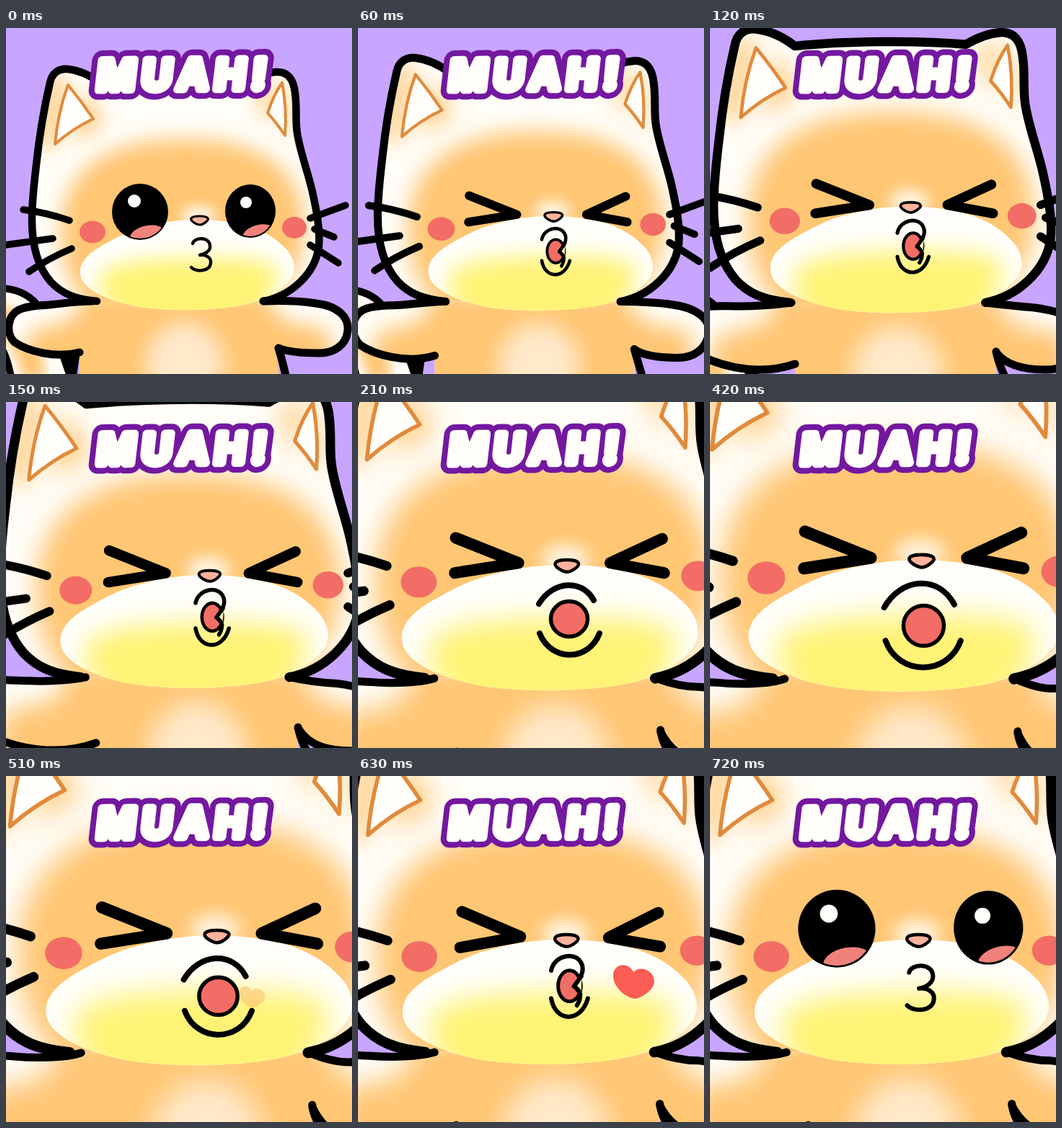
Animation, 480 px wide and 480 px high, one loop 0.75 s. Source, as an HTML page:

```html
<!DOCTYPE html>
<html lang="en">
<head>
<meta charset="utf-8">
<title>Muah!</title>
<style>
html, body { margin: 0; width: 100%; height: 100%; overflow: hidden; background: #c8a5ff; }
svg { display: block; width: 100vw; height: 100vh; }
.ink { fill: none; stroke: #000; stroke-linecap: round; stroke-linejoin: round; }
.word { font: 700 57px Inter, "Open Sans", sans-serif; letter-spacing: 9px; text-anchor: middle; stroke-linejoin: round; }
</style>
</head>
<body>
<svg viewBox="0 0 480 480">
  <defs>
    <filter id="soft" x="-40%" y="-40%" width="180%" height="180%"><feGaussianBlur stdDeviation="14"/></filter>
    <filter id="fine" x="-40%" y="-60%" width="180%" height="220%"><feGaussianBlur stdDeviation="8"/></filter>
    <path id="skull" d="M126 379C96 376 78 369 62 352C43 330 36 298 36 266C36 240 39 215 42 190C46 152 53 110 61 76C64 61 74 56 86 57C104 59 119 67 132 77C190 71 275 70 334 75C346 68 360 62 374 61C392 60 399 72 401 90C404 112 401 128 404 146C408 172 419 200 425 227C431 254 436 280 434 303C429 342 394 372 357 379"/>
    <path id="snout" d="M103 337C104 320 121 308 142 297C158 288 175 280 192 276C220 268 244 266 266 266C293 266 318 269 340 276C360 283 374 292 385 303C394 311 400 322 400 334C398 359 360 379 325 385C280 393 220 393 180 386C140 378 101 362 103 337Z"/>
    <clipPath id="inSkull"><use href="#skull"/></clipPath>
    <clipPath id="inSnout"><use href="#snout"/></clipPath>
    <clipPath id="inBody"><path id="bodyClip"/></clipPath>
    <clipPath id="inEyeL"><circle cx="186" cy="255" r="37"/></clipPath>
    <clipPath id="inEyeR"><ellipse cx="339" cy="254" rx="33" ry="35"/></clipPath>
  </defs>
  <rect width="480" height="480" fill="#c8a5ff"/>

  <g id="tail">
    <path d="M-20 361C12 359 34 369 48 390C72 425 74 455 90 490L8 490C4 465 -4 440 -20 425Z" fill="#fffdf8"/>
    <path d="M-10 395Q30 430 40 485" fill="none" stroke="#ffc673" stroke-width="34" filter="url(#fine)"/>
    <path class="ink" stroke-width="10" d="M-20 361C12 359 34 369 48 390M-20 425C-4 440 4 465 8 490"/>
    <path d="M73 452L103 448L98 484L84 484Z"/>
  </g>

  <path id="bodyFill" fill="#fffdf8"/>
  <g clip-path="url(#inBody)">
    <g id="bodyTint">
      <path d="M108 365L362 365Q372 408 410 412Q452 412 452 440L452 520L28 520L28 440Q30 412 70 412Q100 408 108 365Z" fill="#ffc673" filter="url(#soft)"/>
      <ellipse cx="248" cy="466" rx="54" ry="58" fill="#ffe9cb" filter="url(#soft)"/>
    </g>
  </g>

  <g id="head">
    <use href="#skull" fill="#fffdf8"/>
    <g clip-path="url(#inSkull)">
      <g fill="#ffc673" filter="url(#soft)">
        <path d="M76 280C78 190 150 154 245 154C340 154 408 184 414 270C416 330 392 350 355 400L126 400C100 370 75 340 76 280Z"/>
        <path d="M60 70L84 66L66 165L42 165ZM104 84L136 130L92 158ZM346 84L374 70L364 140ZM388 70L408 120L396 160Z"/>
      </g>
      <ellipse cx="267" cy="260" rx="24" ry="14" fill="#fff4e2" filter="url(#fine)"/>
    </g>
    <use href="#snout" fill="#fffefa"/>
    <g clip-path="url(#inSnout)">
      <path d="M130 345Q140 321 250 319Q364 315 378 336Q376 380 330 415L170 415Q128 385 130 345Z" fill="#fff374" filter="url(#soft)"/>
    </g>
    <g fill="#fffefa" stroke="#e18a3b" stroke-width="4" stroke-linejoin="round">
      <path d="M86 79Q105 102 121 126Q93 139 68 161Q72 117 86 79Z"/>
      <path d="M383 76Q371 93 363 118Q375 131 387 149Q390 111 383 76Z"/>
    </g>
    <use class="ink" href="#skull" stroke-width="10.5"/>
    <path class="ink" stroke-width="9.5" d="M24 252Q56 256 88 267M-8 302L65 292M32 338Q58 320 91 306M422 264L471 246M428 279L455 290M422 301L461 326"/>
    <g fill="#f26d65">
      <ellipse cx="120" cy="283" rx="18" ry="15.5"/>
      <ellipse cx="400" cy="277" rx="17" ry="15"/>
    </g>
    <path class="ink" style="fill:#ffb29c" stroke-width="3.2" d="M257 264C259 260 278 260 280 264C282 267 273 273 269 273C265 273 255 268 257 264Z"/>
    <g id="open">
      <circle cx="186" cy="255" r="39"/>
      <ellipse cx="339" cy="254" rx="35" ry="37"/>
      <g fill="#ef827b">
        <g clip-path="url(#inEyeL)"><ellipse cx="197" cy="288" rx="25" ry="14" transform="rotate(-10 197 288)"/></g>
        <g clip-path="url(#inEyeR)"><ellipse cx="351" cy="286" rx="23" ry="13" transform="rotate(-14 351 286)"/></g>
      </g>
      <g fill="#fffefa"><circle cx="178" cy="240" r="9"/><circle cx="333" cy="242" r="8"/></g>
    </g>
    <path id="shut" class="ink" stroke-width="11.5"/>
    <path id="three" class="ink" stroke-width="4.4" d="M259 299C261 290 282 289 283 302C284 309 276 314 269 315C278 314 285 319 284 326C283 338 264 339 257 332"/>
    <g id="pout" class="ink" stroke-width="4.4">
      <ellipse cx="271.5" cy="312.5" rx="11.5" ry="15.5" style="fill:#f26d65" stroke-width="3.6"/>
      <path style="fill:#fff9b8" stroke-width="3.2" d="M284 303L276 313L283 321"/>
      <path d="M253 297C256 281 279 277 284 291C287 299 281 306 276 313C283 317 284 324 279 332M253 325C257 349 283 350 290 325"/>
    </g>
  </g>

  <path id="bodyInk" class="ink" stroke-width="11"/>

  <g id="kiss" class="ink">
    <ellipse id="hole" stroke-width="5.5" style="fill:#f26d65"/>
    <path id="arcs" stroke-width="8"/>
  </g>
  <path id="heart" d="M3 23C-10 22 -27 8 -28 -8C-29 -25 -8 -30 0 -14C10 -24 29 -16 29 -1C29 11 12 21 3 23Z"/>

  <g transform="translate(246 85) rotate(-.5) skewX(-7)">
    <text class="word" fill="#73189f" stroke="#73189f" stroke-width="27">MUAH!</text>
    <text class="word" fill="#fffefa" stroke="#fffefa" stroke-width="11">MUAH!</text>
  </g>
</svg>
<script>
const LOOP = 750, STEP = 30;
const $ = id => document.getElementById(id);
const set = (id, attrs) => { for (const k in attrs) $(id).setAttribute(k, attrs[k]); };
const show = (id, on) => set(id, { visibility: on ? "visible" : "hidden" });
const clamp = v => Math.min(1, Math.max(0, v));
const ramp = (t, a, b) => clamp((t - a) / (b - a));
const ease = p => (1 - Math.cos(Math.PI * p)) / 2;

// Blend every number of two equally built path strings.
function morph([a, b], k) {
  const to = b.match(/-?[\d.]+/g);
  let i = 0;
  return a.replace(/-?[\d.]+/g, n => (+n + (to[i++] - n) * k).toFixed(2));
}

const armL = ["M119 379C95 379 82 382 60 384C45 385 32 385 20 390C0 398 0 425 12 436C30 448 68 459 102 450",
              "M113 381C90 384 65 386 40 386C18 386 5 385 -10 387C-40 395 -40 430 -20 450C0 464 60 486 118 466"];
const armR = ["M357 379C380 378 405 378 430 382C462 386 476 402 474 420C472 440 455 451 435 451C415 451 390 449 378 444",
              "M383 381C405 384 428 386 450 388C492 393 522 410 520 430C510 465 490 474 465 474C440 474 412 470 397 450"];
const side = ["M378 444Q383 460 389 486", "M397 449Q401 468 412 490"];
const mouthArcs = ["M251 280C270 248 311 245 327 275M252 321C268 361 320 360 335 321",
                   "M240 286C264 243 318 238 341 282M242 333C260 384 332 384 350 333"];

// Both arms and the torso between them as one closed area.
function bodyFill(l, r) {
  const start = p => p.match(/^M(\S+ [\d.-]+)/)[1];
  const end = p => p.match(/[\d.-]+ [\d.-]+$/)[0];
  const below = p => end(p).split(" ")[0] + " 600";
  return `${l}L${below(l)}L${below(r)}L${end(r)}L${start(r)}L${start(l)}Z${r}Z`;
}

const zoom = t => 1 + 0.45 * ease(ramp(t, 0, 280)) - 0.075 * ease(ramp(t, 480, 570));

function draw(t) {
  const s = zoom(t), sy = 1 + (s - 1) * 1.02, k = (s - 1) / 0.175;
  set("head", { transform: `translate(213 368) scale(${s} ${sy}) translate(-213 -368)` });
  set("bodyTint", { transform: `translate(${235 + 10 * k} 378) scale(${s}) translate(-235 -378)` });
  set("tail", { transform: `translate(${-32 * k} ${6 * k})` });

  const l = morph(armL, k), r = morph(armR, k), fill = bodyFill(l, r);
  set("bodyFill", { d: fill });
  set("bodyClip", { d: fill });
  set("bodyInk", { d: l + r + morph(side, k) });

  const shut = t >= 60 && t < 690;
  show("open", !shut);
  show("shut", shut);
  set("shut", { d: t >= 570
    ? "M163 238L222 263L161 274M361 239L311 264L363 273"
    : "M157 239L220 264L156 274M364 240L312 264L366 274" });

  const pout = (t >= 60 && t < 165) || (t >= 570 && t < 675);
  const kiss = t >= 165 && t < 570;
  show("three", !pout && !kiss);
  show("pout", pout);
  show("kiss", kiss);
  const wide = ramp(t, 210, 330) - 0.6 * ramp(t, 390, 510) - 0.4 * ramp(t, 510, 570);
  set("hole", { cx: 293 + 4 * wide, cy: 301 + 11 * wide, rx: 25.5 + 3 * wide, ry: 24.5 + 4 * wide });
  set("arcs", { d: morph(mouthArcs, wide) });

  const p = (t - 510) / 120;
  show("heart", t >= 480 && t < 720);
  set("heart", {
    transform: `translate(${341 + 41 * p} ${307 - 21 * p}) scale(${0.64 + 0.36 * p})`,
    fill: t < 540 ? "#fbb35f" : "#fb5c54",
    opacity: (0.3 + 0.7 * ramp(t, 480, 600)) * (1 - ramp(t, 650, 715))
  });
}

const origin = performance.now();
function tick() {
  const t = (performance.now() - origin) % LOOP;
  draw(Math.floor(t / STEP) * STEP);
  requestAnimationFrame(tick);
}
draw(0);
requestAnimationFrame(tick);
</script>
</body>
</html>
```
